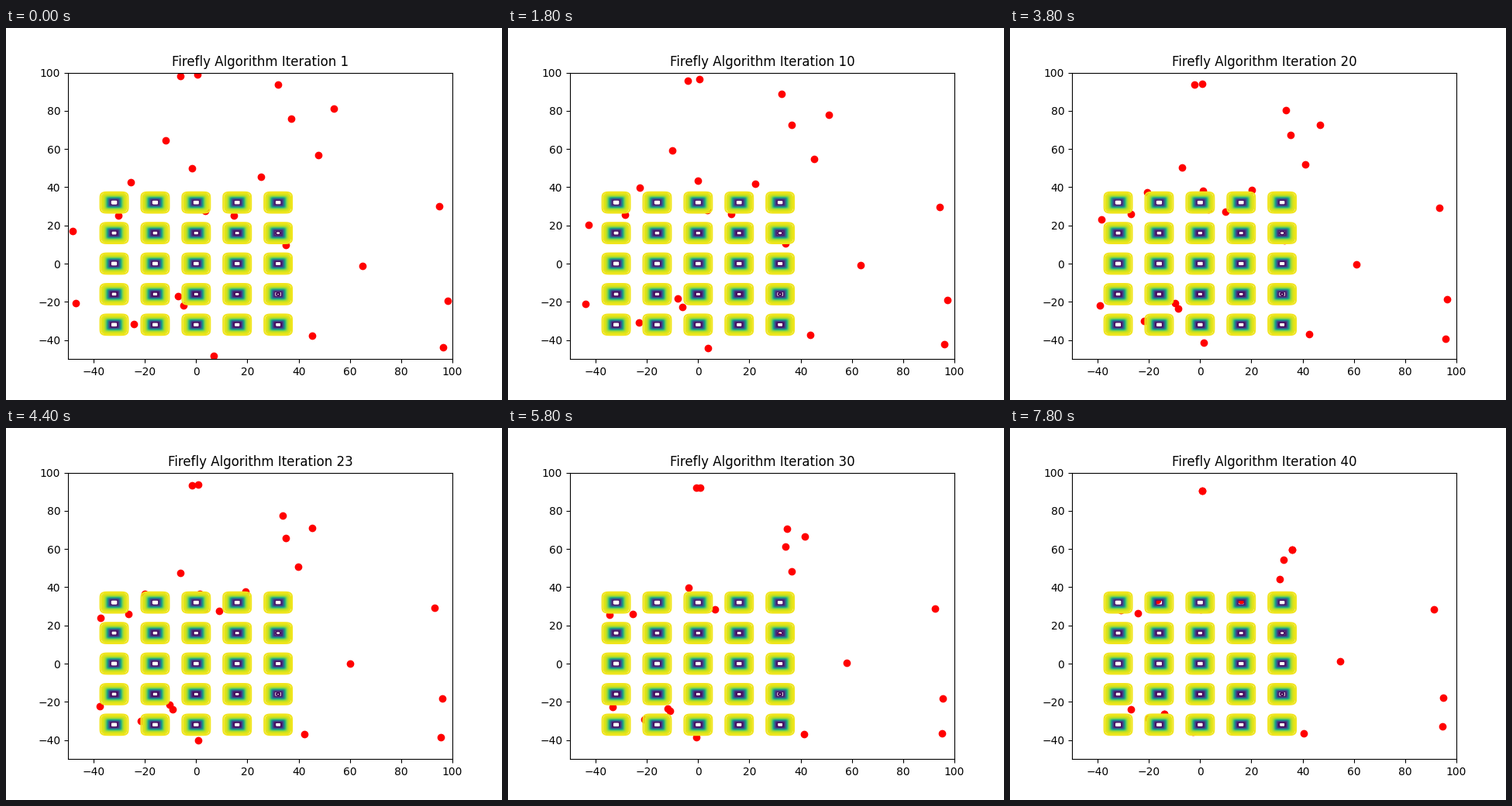
A matplotlib script that plays this animation: 640x480 px, repeating every 8 s.

```python
import numpy as np
import matplotlib.pyplot as plt
from matplotlib.animation import FuncAnimation

FRAMES = 40
LOW, HIGH = -50, 100

# Fireflies as {goal: [starts]} in stage pixels.
# Attracted ones speed up towards their goal, wandering ones slow down.
ATTRACTED = {
    (364, 157): [(351, 73), (423, 104)],
    (353, 170): [(368, 117)],
    (348, 195): [(403, 164)],
    (246, 234): [(206, 145)],
    (254, 230): [(257, 236), (294, 242)],
    (547, 234): [(559, 230)],
    (343, 264): [(361, 280)],
    (426, 301): [(460, 307)],
    (558, 385): [(564, 412)],
    (156, 363): [(90, 355)],
    (199, 369): [(222, 346), (229, 358)],
}
WANDERING = {
    (248, 81): [(225, 62), (247, 60)],
    (256, 233): [(240, 181)],
    (298, 222): [(329, 192)],
    (190, 222): [(161, 199)],
    (165, 239): [(145, 242)],
    (143, 235): [(86, 262)],
    (559, 348): [(570, 352)],
    (379, 394): [(395, 397)],
    (236, 392): [(268, 423)],
    (179, 375): [(165, 382)],
}


def foxholes(x, y):
    """Shekel's foxholes: a 5 x 5 lattice of steep pits."""
    total = 0.002
    for i in range(25):
        cx, cy = 16 * (i % 5 - 2), 16 * (i // 5 - 2)
        total = total + 1 / (i + 1 + (x - cx) ** 6 + (y - cy) ** 6)
    return 1 / total


def to_data(px):
    left, top, width, height = 80, 57.6, 496, 369.6
    x, y = np.array(px).T
    span = HIGH - LOW
    return np.column_stack([LOW + (x - left) / width * span,
                            HIGH - (y - top) / height * span])


def swarm(groups):
    pairs = [(start, goal) for goal, starts in groups.items()
             for start in starts]
    starts, goals = zip(*pairs)
    return to_data(starts), to_data(goals)


def move(group, ease):
    start, goal = group
    return start + (goal - start) * ease


attracted, wandering = swarm(ATTRACTED), swarm(WANDERING)

fig, ax = plt.subplots(figsize=(6.4, 4.8), dpi=100)
axis = np.linspace(LOW, HIGH, 301)
X, Y = np.meshgrid(axis, axis)
ax.contour(X, Y, foxholes(X, Y), 50, cmap="viridis", zorder=2)
dots = ax.scatter([], [], color="red", zorder=1)
title = ax.set_title("")
ax.set_xlim(LOW, HIGH)
ax.set_ylim(LOW, HIGH)


def update(n):
    u = n / (FRAMES - 1)
    dots.set_offsets(np.vstack([move(attracted, u ** 1.3),
                                move(wandering, u ** 0.8)]))
    title.set_text(f"Firefly Algorithm Iteration {n + 1}")
    return dots, title


anim = FuncAnimation(fig, update, frames=FRAMES, interval=200,
                     repeat=True, repeat_delay=0)
plt.show()
```
